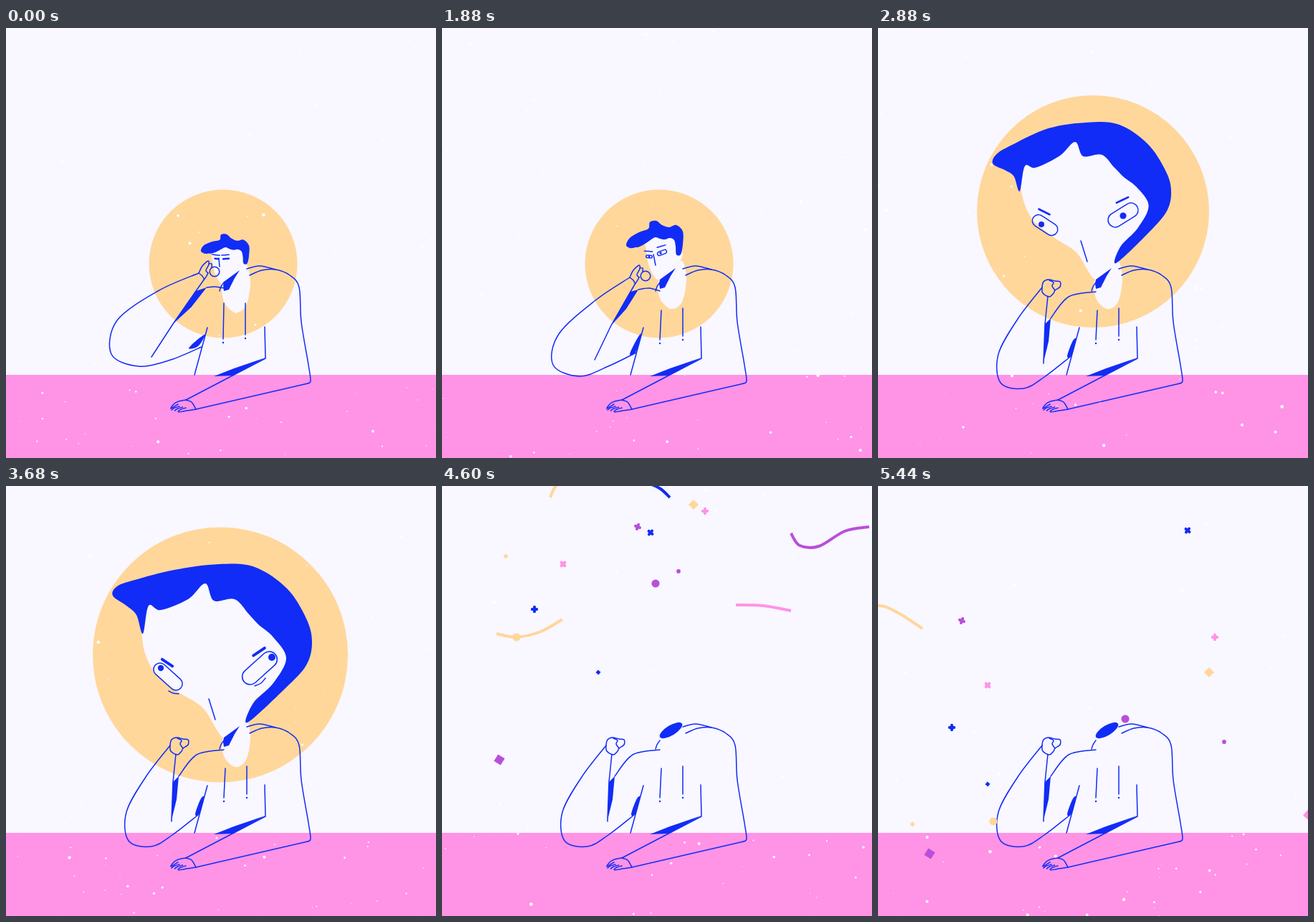
Recreate the animation shown at these times as an HTML page with a canvas. Size 600 px wide and 600 px high, loop 5480 ms.

```html
<!DOCTYPE html>
<html lang="en">
<head>
<meta charset="utf-8">
<title>Head burst</title>
<style>
html, body { margin: 0; width: 100%; height: 100%; overflow: hidden; background: #f9f7ff; }
canvas { display: block; width: 600px; height: 600px; }
</style>
</head>
<body>
<canvas id="stage" width="600" height="600"></canvas>
<script>
const ctx = document.getElementById('stage').getContext('2d');
const PAPER = '#f9f7ff', PINK = '#ff93e6', SUN = '#ffd79b', BLUE = '#112cf6', PURPLE = '#b84fdb';
const LOOP = 5480, STEP = 40, POP = 4200, GROW = 1900;

const lerp = (a, b, k) => a + (b - a) * k;
const mix = (a, b, k) => a.map((v, i) => lerp(v, b[i], k));
const smooth = k => k * k * (3 - 2 * k);
const shift = (pts, dx, dy) => pts.map((v, i) => v + (i % 2 ? dy : dx));
function warp(pts, fn) {
  const out = [];
  for (let i = 0; i < pts.length; i += 2) out.push(...fn(pts[i], pts[i + 1]));
  return out;
}

// Poses: 0 leaning in, 1 leaning back, 2 alert, 3 swollen, 4 full size
const poses = (lean, alert, full) => [lean, mix(lean, alert, .5), alert, full, full];

const hairSmall = [
  257,303, 262,293, 275,285, 288,280, 290,271, 299,269, 307,275, 317,278, 327,275,
  336,284, 336,302, 333,316, 327,316, 326,305, 324,296, 318,293, 311,295, 304,294,
  298,292, 292,295, 285,300, 278,304, 273,306, 270,306, 267,307, 265,307, 262,307];
const hairBig = [
  149,153, 155,140, 180,131, 235,117, 298,109, 347,113, 392,143, 419,185, 427,218,
  419,250, 390,282, 337,330, 345,303, 373,275, 391,240, 372,210, 353,194, 339,179,
  319,158, 290,160, 278,136, 254,158, 216,173, 199,167, 191,206, 182,180, 168,167];
const hairBack = warp(hairSmall, (x, y) => [338 - (336 - x) * .85, 318 - (318 - y) * .8 + (x - 299) * .1]);
const hairMid = warp(mix(hairSmall, hairBig, .86), (x, y) => [x - 4, y + Math.max(0, 240 - x) * .2]);
const hair = [shift(hairBack, 1, 9), hairBack, hairSmall, hairMid, hairBig];

const faceSmall = [284,298, 285,308, 287,325, 290,335, 295,345, 303,351, 322,337, 335,320, 334,310, 330,295, 300,286];
const faceBig = [200,165, 190,212, 205,257, 240,287, 275,310, 303,351, 325,336, 338,318, 348,298, 394,242, 275,120];
const face = [shift(faceSmall, 2, 8), shift(faceSmall, 3, 0), faceSmall, mix(faceSmall, faceBig, .9), faceBig];

// Eyes: x, y, half length, radius, angle, pupil x, pupil y
const leftEye = [
  [294,322, 2.5,.5,8, 294,322], [295,316, 2,1.8,0, 294,316], [289,319, 2.5,1.8,5, 289,319],
  [233,275, 11,8.5,33, 228,274], [226,266, 15,9,42, 216,254]];
const rightEye = [
  [307,322, 4,.5,-5, 308,322], [307,314, 3,2.3,-6, 304,314], [307,313.5, 4,2.7,-20, 305,314],
  [342,261, 13,10,-32, 342,262], [354,254, 18,11,-42, 371,239]];
const nose = poses([297,321, 298,333], [295,316, 298,331], [283,297, 292,326]);

const arm = poses(
  [269,342, 212,367, 155,408, 147,455, 185,472, 230,463, 273,445],
  [262,348, 214,380, 163,427, 155,470, 192,486, 232,472, 271,453],
  [229,362, 195,406, 168,455, 171,495, 203,503, 232,487, 268,459]);
arm[1] = [269,347, 212,377, 160,417, 152,458, 188,478, 230,470, 272,449];
// Inner arm: shadow start, shadow end, line end
const inner = poses(
  [265,367, 233,413, 203,459], [263,368, 236,415, 213,463], [233,413, 231,466, 231,468]);
const shoulder = poses(
  [304,363, 292,361, 280,362], [304,367, 289,363, 274,365], [304,368, 266,375, 241,405]);
const armpit = poses(
  [278,428, 268,434, 255,447, 268,444], [278,427, 272,434, 262,455, 271,451], [276,434, 271,438, 264,458, 270,457]);
const strings = poses(
  [304,384, 303,434, 334,384, 334,428], [306,394, 304,435, 336,391, 336,430], [306,394, 304,435, 336,391, 336,430]);
const sun = poses([303,329,103.5], [303,329,103.5], [299,235.5,178]);
sun[3] = [300,256,162];

const openHand = [
  [0,0, 5,-10, 13,-17, 14,-12, 10,-4, 13,0],
  [14,-13, 18,-13, 18,-8],
  [0,0, 5,4, 8,8, 13,0]
];
const fist = [0,0, 2,-8, 9,-11, 18,-9, 25,-8, 25,-1, 18,4, 16,8, 10,13, 1,8];
const knuckles = [10,-10, 16,-7, 14,-2, 18,4];

const curves = [
  [336,336, 354,332, 376,337],
  [340,345, 357,338, 376,337, 396,345, 409,362, 412,410, 422,470, 425,492, 421,496],
  [251,519, 259,522, 265,532],
  [304,355, 300,361, 298,367],
  [251,519, 241,521, 235,524, 230,531, 240,525],
  [241,536, 252,534, 265,532]
];
const edges = [
  [421,496, 265,532],
  [251,519, 316,485, 362,461, 361,417],
  [281,418, 263,484]
];

// Confetti: shape, colour, size, place after the burst, place at the end
const confetti = [
  ['cross', PURPLE, 5, 273,57, 117,188],
  ['cross', BLUE, 5, 291,65, 432,62],
  ['cross', PINK, 5, 169,109, 153,278],
  ['cross', BLUE, 5, 129,172, 103,337],
  ['cross', PINK, 5, 367,35, 470,211],
  ['square', SUN, 10, 351,26, 462,260],
  ['square', SUN, 5, 89,98, 48,472],
  ['square', BLUE, 5, 218,260, 153,416],
  ['square', PURPLE, 11, 80,382, 72,513],
  ['square', PINK, 10, 612,180, 600,459],
  ['dot', PURPLE, 5.6, 298,136, 345,325],
  ['dot', PURPLE, 2.9, 330,119, 483,357],
  ['dot', SUN, 5.5, 104,211, 161,468]
];
const turns = [20, 40, 45, 0, 0, 45, 45, 40, 32, 40];
// Streamers: colour, points after the burst, later offsets of the points
const streamers = [
  [SUN, [76,206, 104,211, 138,203, 168,186], [-106,-24, -104,-44, -110,-26, -106,13]],
  [SUN, [151,16, 158,1, 175,-18], [-180,-60]],
  [BLUE, [290,-3, 305,4, 318,16], [60,-140]],
  [PURPLE, [487,66, 499,83, 526,84, 562,63, 596,57], [190,50]],
  [PINK, [410,166, 448,167, 487,174], [230,90]]
];

function pose(keys, q) {
  const i = Math.min(3, Math.floor(q));
  return mix(keys[i], keys[i + 1], q - i);
}

// Swelling: a quick start with a long settle
function swell(t) {
  const u = Math.min(1, Math.max(0, (t - GROW) / 2200));
  return 1 - (1 - u) ** 4 * (1 + 3.5 * u);
}

function poseAt(t) {
  if (t < 1120) return smooth(t / 1120);
  if (t < 1880) return 1 + smooth((t - 1120) / 760);
  const p = swell(t);
  return p < .758 ? 2 + p / .758 : Math.min(4, 3 + (p - .758) / .237);
}

// Smooth curve through the points
function trace(pts, closed) {
  const n = pts.length / 2;
  const at = i => {
    i = closed ? (i + n) % n : Math.max(0, Math.min(n - 1, i));
    return [pts[2 * i], pts[2 * i + 1]];
  };
  ctx.beginPath();
  ctx.moveTo(pts[0], pts[1]);
  for (let i = 0; i < (closed ? n : n - 1); i++) {
    const [a, b, c, d] = [at(i - 1), at(i), at(i + 1), at(i + 2)];
    ctx.bezierCurveTo(b[0] + (c[0] - a[0]) / 6, b[1] + (c[1] - a[1]) / 6,
      c[0] - (d[0] - b[0]) / 6, c[1] - (d[1] - b[1]) / 6, c[0], c[1]);
  }
}

function stroke(width = 1.5, color = BLUE) {
  ctx.lineWidth = width;
  ctx.strokeStyle = color;
  ctx.stroke();
}

function fill(color = BLUE) {
  ctx.fillStyle = color;
  ctx.fill();
}

function line(pts, width, color, closed) {
  trace(pts, closed);
  stroke(width, color);
}

function blob(pts, color) {
  trace(pts, true);
  fill(color);
}

function poly(pts, paint) {
  ctx.beginPath();
  for (let i = 0; i < pts.length; i += 2) ctx.lineTo(pts[i], pts[i + 1]);
  paint();
}

function disc(x, y, r, color) {
  ctx.beginPath();
  ctx.arc(x, y, r, 0, 7);
  fill(color);
}

function grain(t) {
  let seed = 7919 * (Math.floor(t / 80) + 3);
  const rnd = () => (seed = seed * 16807 % 2147483647) / 2147483647;
  for (let i = 0; i < 10; i++) rnd();
  const specks = (count, top, height) => {
    for (let i = 0; i < count; i++) {
      disc(rnd() * 600, top + rnd() * height, .3 + 2.1 * rnd() ** 6, '#fffdff');
    }
  };
  specks(200, 0, 484);
  specks(85, 484, 116);
}

function drawEye([x, y, half, r, angle, px, py], browWidth) {
  const a = angle * Math.PI / 180, brow = 5 + r * .4;
  ctx.save();
  ctx.translate(x, y);
  ctx.rotate(a);
  ctx.beginPath();
  ctx.roundRect(-half - r, -r, 2 * (half + r), 2 * r, r);
  stroke();
  ctx.rotate(-a);
  ctx.translate(-1, -4.5 - r * 1.65);
  ctx.rotate(a * .8);
  line([-brow, 0, brow, 0], browWidth);
  ctx.restore();
  disc(px, py, .6 + r * .4);
}

function drawHead(q) {
  const drop = Math.max(0, 1 - q) * 5, browWidth = 1.5 + Math.max(0, q - 2) * 1.2;
  blob(shift([303,350, 304,377, 320,392, 335,382, 341,350, 335,325, 322,337], 0, drop), PAPER);
  blob(pose(face, q), PAPER);
  poly(shift([326,335, 304,351, 303,357, 304,364, 311,362, 319,346], 0, drop * .6), fill);
  blob(pose(hair, q));
  drawEye(pose(leftEye, q), browWidth);
  drawEye(pose(rightEye, q), browWidth);
  line(pose(nose, q));
  if (q > 3.5) {
    line([227,286, 233,289, 241,290]);
    line([347,279, 356,275, 362,268]);
  }
}

function drawArm(q) {
  const outer = pose(arm, q), [x, y] = outer;
  const top = pose(shoulder, q), [endX, endY] = top.slice(4);
  const bone = pose(inner, q), [bx, by, cx, cy] = bone;
  line(outer);
  line(top);
  poly([x + 8, y + 8 + Math.max(0, Math.min(1, q - 2)) * 4, ...bone], stroke);
  poly([endX, endY, bx, by, cx, cy, (cx + endX) / 2 + 2, (cy + endY) / 2 + 2], fill);
  blob(pose(armpit, q));
  if (q < 2.5) {
    for (const part of openHand) line(shift(part, x, y));
    ctx.beginPath();
    ctx.arc(x + 22, y - 2, 6.8, 0, 7);
    stroke();
  } else {
    line(shift(fist, x, y), 1.5, BLUE, true);
    line(shift(knuckles, x, y));
  }
}

function drawBody(q) {
  for (const c of curves) line(c);
  for (const e of edges) poly(e, stroke);
  // Fingers on the table
  for (let i = 0; i < 3; i++) line(shift([0,0, 4,-3, 11,-5], 231 + 4.5 * i, 533 + i));
  poly([290,486, 318,475, 362,460, 316,485], fill);
  const s = pose(strings, q);
  for (const cord of [s.slice(0, 4), s.slice(4)]) {
    line(cord);
    disc(cord[2], cord[3] + 5, 1.2);
  }
}

// Burst and drift that cover d1 by .4 s and d2 by 1.24 s
const burst = s => 1 - Math.exp(-6 * s);
function drift(d1, d2, s, power) {
  const s1 = burst(.4), s2 = burst(1.24), g1 = .4 ** power, g2 = 1.24 ** power;
  const det = s1 * g2 - s2 * g1;
  return (d1 * g2 - d2 * g1) / det * burst(s) + (s1 * d2 - s2 * d1) / det * s ** power;
}
const fly = (x1, y1, x2, y2, s) =>
  [299 + drift(x1 - 299, x2 - 299, s, 1), 235 + drift(y1 - 235, y2 - 235, s, 2)];

function drawBurst(s) {
  ctx.lineCap = 'butt';
  for (const [color, pts, off] of streamers) {
    let i = 0;
    line(warp(pts, (x, y) => {
      const dx = off[i++ % off.length], dy = off[i++ % off.length];
      return fly(x, y, x + dx, y + dy, s);
    }), 4, color);
  }
  ctx.lineCap = 'round';
  confetti.forEach(([shape, color, size, ...path], i) => {
    ctx.save();
    ctx.translate(...fly(...path, s));
    ctx.rotate(((turns[i] || 0) + (s - .4) * 107) * Math.PI / 180);
    if (shape === 'dot') disc(0, 0, size, color);
    else if (shape === 'square') {
      ctx.fillStyle = color;
      ctx.fillRect(-size / 2, -size / 2, size, size);
    } else {
      const reach = size - 1.8;
      line([-reach, 0, reach, 0], 4, color);
      line([0, -reach, 0, reach], 4, color);
    }
    ctx.restore();
  });
}

function draw(t) {
  const q = poseAt(t), whole = t < POP;
  ctx.lineCap = ctx.lineJoin = 'round';
  ctx.fillStyle = PAPER;
  ctx.fillRect(0, 0, 600, 600);
  if (whole) disc(...pose(sun, q), SUN);
  ctx.fillStyle = PINK;
  ctx.fillRect(0, 484, 600, 116);
  grain(t);
  if (whole) drawHead(q);
  drawBody(q);
  drawArm(q);
  if (!whole) {
    ctx.beginPath();
    ctx.ellipse(319.5, 341, 18, 7, -.55, 0, 7);
    fill();
    drawBurst((t - POP) / 1000);
  }
}

const start = performance.now();
function tick() {
  const t = Math.max(0, performance.now() - start) % LOOP;
  draw(Math.floor(t / STEP) * STEP);
  requestAnimationFrame(tick);
}
tick();
</script>
</body>
</html>
```
